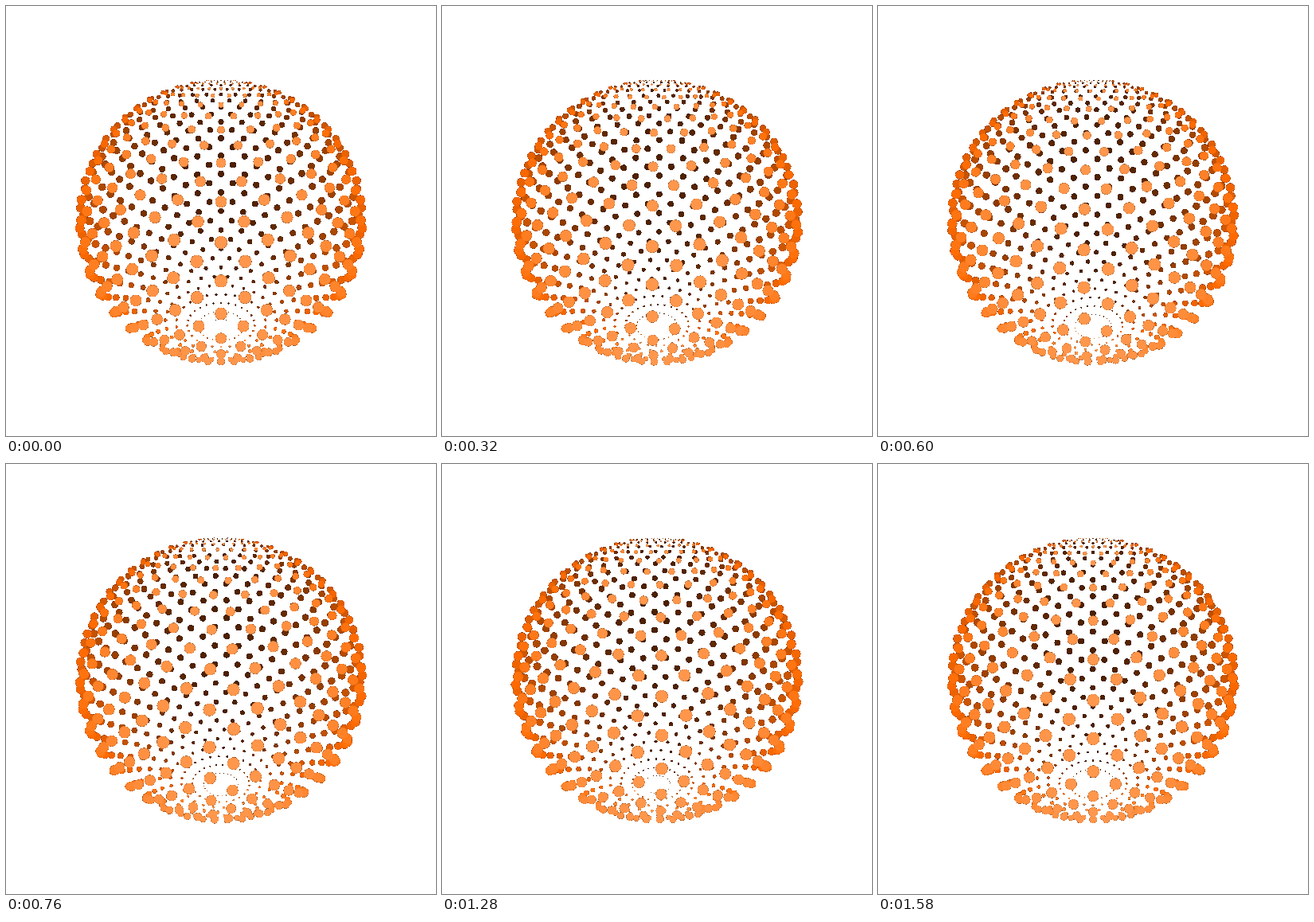
An HTML page with a canvas that plays this animation: 540x540 px, repeating every 1.6 s.

```html
<!DOCTYPE html>
<html lang="en">
<head>
<meta charset="utf-8">
<title>Dotted sphere</title>
<style>
  html, body { margin: 0; width: 100%; height: 100%; overflow: hidden; background: #fff; }
  canvas { display: block; width: 540px; height: 540px; }
</style>
</head>
<body>
<canvas id="stage" width="540" height="540"></canvas>
<script>
const SIZE = 540, CENTER = SIZE / 2;
const ctx = document.getElementById('stage').getContext('2d', { willReadFrequently: true });

const LOOP = 1600, TICK = 20;
const RINGS = 32, PER_RING = 26;
const DISTANCE = 2.705, FOCAL = 446.4;   // camera, in sphere radii and px
const DOT = 0.0323;                      // dot radius on the equator
const TILT = 22.8 * Math.PI / 180;
const SIN_T = Math.sin(TILT), COS_T = Math.cos(TILT);

function project(lat, lon) {
  const width = Math.cos(lat);
  const up = Math.sin(lat);
  const front = width * Math.cos(lon);
  const y = up * COS_T - front * SIN_T;
  const z = up * SIN_T + front * COS_T;
  const scale = FOCAL / (DISTANCE - z);
  return {
    x: CENTER + width * Math.sin(lon) * scale,
    y: CENTER - y * scale,
    z,
    r: DOT * width * scale,
    light: 40 + 25 * Math.cos(lon)
  };
}

// Each dot slides one ring down and half a gap sideways per loop.
function dotsAt(phase) {
  const dots = [];
  for (let k = 0; k < RINGS; k++) {
    const lat = Math.PI * (0.5 - (k + phase) / RINGS);
    const shift = (k + phase + 1) / 2;
    for (let j = 0; j < PER_RING; j++) {
      dots.push(project(lat, (j - shift) * 2 * Math.PI / PER_RING));
    }
  }
  return dots.sort((a, b) => a.z - b.z);
}

// Hard outer edge: soft pixels turn into a dark rim or vanish.
function hardenEdges() {
  const image = ctx.getImageData(0, 0, SIZE, SIZE);
  const px = image.data;
  for (let i = 0; i < px.length; i += 4) {
    const alpha = px[i + 3] / 255;
    for (let c = 0; c < 3; c++) px[i + c] *= alpha;
    px[i + 3] = alpha < 0.5 ? 0 : 255;
  }
  ctx.putImageData(image, 0, 0);
}

function draw(ms) {
  ctx.clearRect(0, 0, SIZE, SIZE);
  for (const d of dotsAt(ms / LOOP)) {
    ctx.fillStyle = `hsl(25 100% ${d.light}%)`;
    ctx.beginPath();
    ctx.arc(d.x, d.y, d.r, 0, 2 * Math.PI);
    ctx.fill();
  }
  hardenEdges();
}

const start = performance.now();
function frame() {
  const t = (performance.now() - start) % LOOP;
  draw(Math.floor(t / TICK) * TICK);
  requestAnimationFrame(frame);
}
frame();
</script>
</body>
</html>
```
